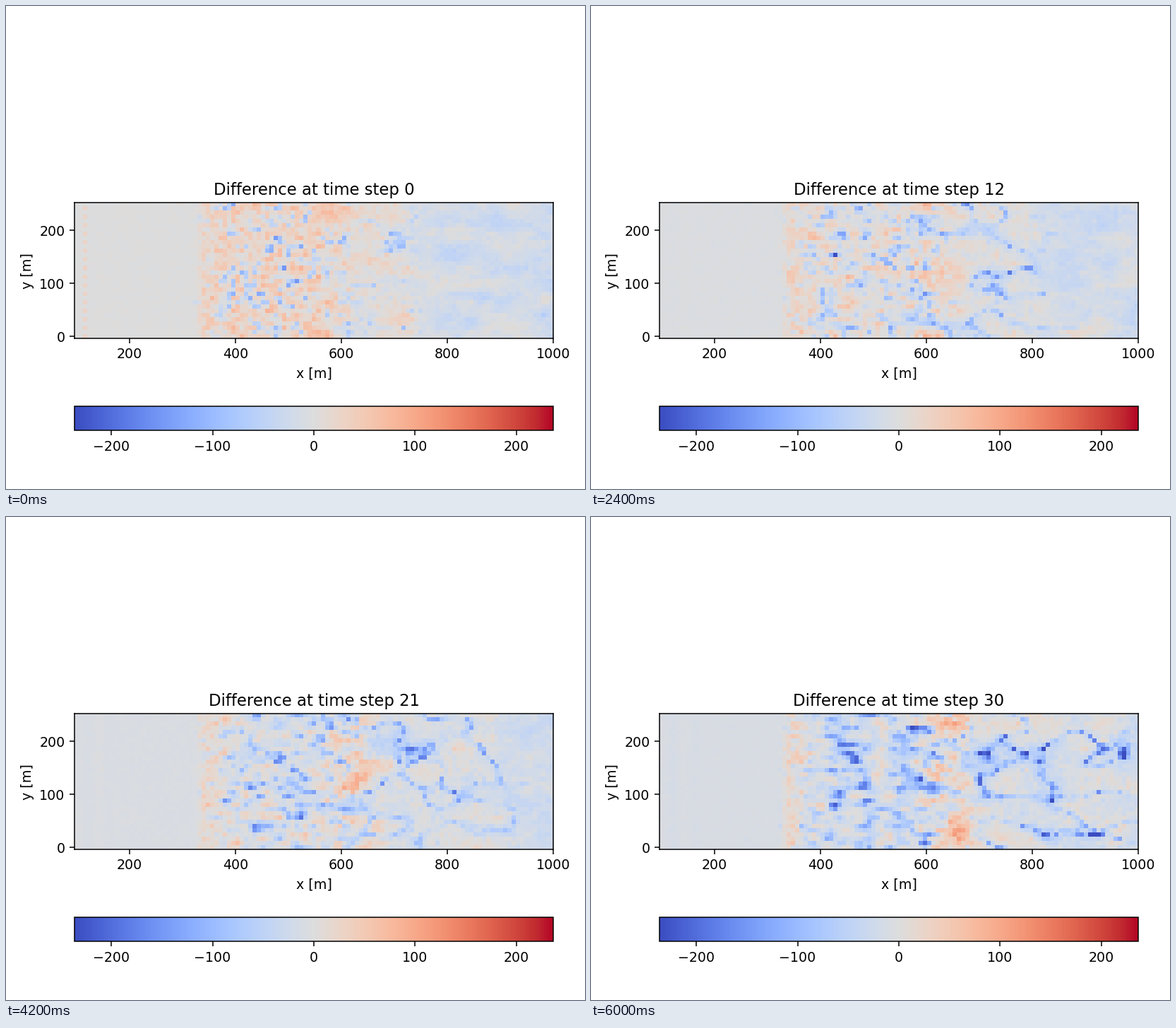
Animation of 820x683 px, one loop 6.2 s. Source, as a matplotlib script:

```python
import numpy as np
import matplotlib.pyplot as plt
from matplotlib.animation import FuncAnimation

STEPS, NY, NX, CELL = 31, 32, 113, 8
VMAX = 236.5
X, Y = np.meshgrid(100 + CELL * np.arange(NX), CELL * np.arange(NY))
rng = np.random.default_rng(12)


def noise(st, sy, sx, drift=0):
    """Unit-variance noise, smoothed in time, y and x, drifting in cells per step."""
    f = np.fft.fftn(rng.normal(size=(STEPS, NY, NX)))
    for axis, s in enumerate((st, sy, sx)):
        shape = [1, 1, 1]
        shape[axis] = -1
        freq = np.fft.fftfreq(f.shape[axis]).reshape(shape)
        f = f * np.exp(-2 * (np.pi * freq * s) ** 2)
    n = np.fft.ifftn(f).real
    n = np.array([np.roll(p, drift * k, axis=1) for k, p in enumerate(n)])
    return n / n.std()


layers = [
    noise(0.5, 0.35, 0.5),      # fine
    noise(0.2, 0.2, 0.2),       # grain
    noise(0.8, 0.5, 1.1, 1),    # streak
    noise(1.5, 1.5, 3.5, 1),    # cloud
    noise(1.5, 1.7, 3.2, 1),    # swirl
]


def bump(x, mid, width):
    return np.exp(-((x - mid) / width) ** 2)


def ramp(x, mid, width):
    return 1 / (1 + np.exp(-np.clip((x - mid) / width, -40, 40)))


def field(k):
    t = k / (STEPS - 1)
    fine, grain, streak, cloud, swirl = (n[k] for n in layers)
    front = 725 + 8.5 * k
    start = ramp(X, 328 + 4 * fine, 2)
    active = start * ramp(front + 20 * cloud, X, 14)

    # calm inlet with faint stripes and a dotted column that fades at once
    z = -1 - 9 * t + 1.2 * grain + 4 * t * np.sin(X / 7) * bump(X, 130, 40)
    z += 28 * np.exp(-1.5 * k) * (X == 116) * (Y % 16 == 0)

    # light wake ahead of the front
    wake = ramp(X, front, 22)
    z += wake * (-18 + 10 * cloud + 6 * streak + 4 * grain)

    # positive rim, then the speckled mixing zone
    z += start * bump(X, 350, 36) * (24 + 17 * fine + 9 * grain)
    mixing = active * ramp(X, 380, 9) * ramp(600 + 60 * t, X, 25)
    m = (1 - 0.6 * t) * fine + (0.35 + 0.6 * t) * streak
    z += mixing * (15 - 36 * t + 27 * m - 52 * np.maximum(-m - 0.65, 0))

    # growing positive band with three lobes
    lobes = 0.8 + 0.4 * np.cos(2 * np.pi * Y / 125)
    band = bump(X, 575 + 2.2 * k, 50) * (lobes + 0.25 * cloud + 0.3 * fine)
    z += active * band * (8 + 42 * t)

    # lumpy negative filaments along contours of a smooth field
    lines = bump(swirl, 0.1, 0.22) * np.clip(0.7 + 0.8 * fine, 0, 3)
    halo = bump(swirl, 0.1, 0.6)
    deep = (60 + 40 * t) * lines + (14 + 22 * t) * halo
    outer = active * ramp(X, 580 - 20 * t, 25)
    z += outer * (8 - 4 * t + 8 * cloud + 8 * grain - deep)
    return z


fields = [field(k) for k in range(STEPS)]

fig, ax = plt.subplots(figsize=(6, 5), dpi=136.67)
im = ax.imshow(fields[0], cmap="coolwarm", vmin=-VMAX, vmax=VMAX,
               origin="lower", extent=(96, 1000, -4, 252),
               interpolation="nearest")
ax.set_xticks(range(200, 1001, 200))
ax.set_yticks([0, 100, 200])
ax.set_xlabel("x [m]")
ax.set_ylabel("y [m]")
title = ax.set_title("Difference at time step 0")
fig.colorbar(im, orientation="horizontal", ticks=range(-200, 201, 100))
fig.tight_layout()


def update(k):
    im.set_data(fields[k])
    title.set_text(f"Difference at time step {k}")
    return im, title


anim = FuncAnimation(fig, update, frames=STEPS, interval=200,
                     repeat=True, repeat_delay=0)
plt.show()
```
